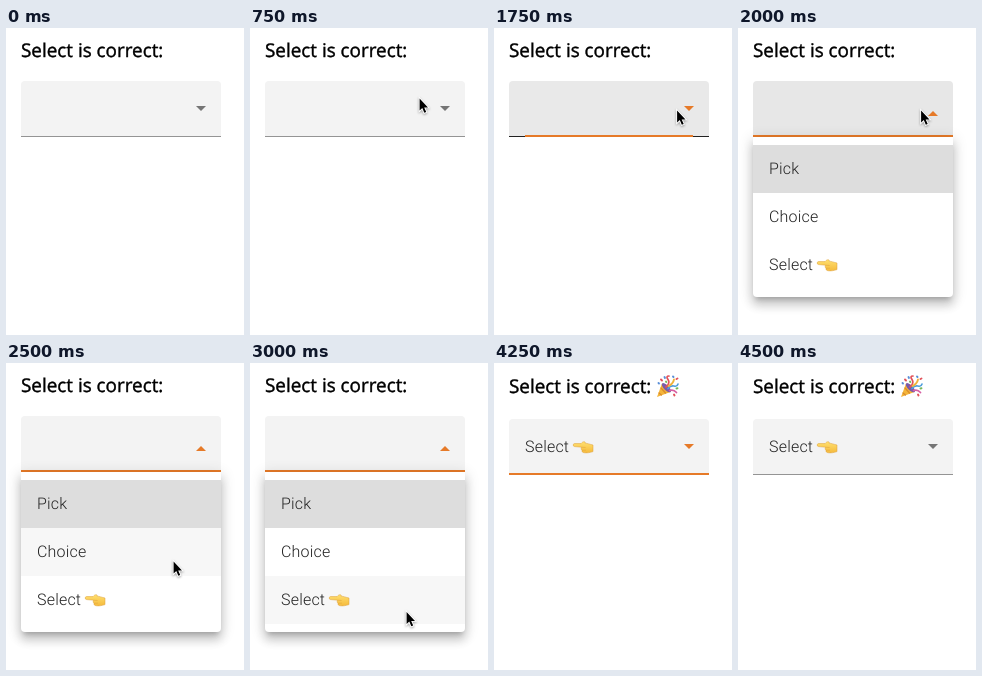
An HTML page for the animation above (5.5 s loop, 238 px wide and 307 px high).

```html
<!DOCTYPE html>
<html lang="en">
<head>
<meta charset="utf-8">
<title>Select is correct</title>
<style>
  html, body { margin: 0; width: 100%; height: 100%; overflow: hidden; background: #fff; }
  svg { display: block; width: 238px; height: 307px; text-rendering: geometricPrecision; }
  .title { font: 400 18.9px "Open Sans", sans-serif; stroke: #000; stroke-width: .4px; }
  .option { font: 300 16px Roboto, sans-serif; letter-spacing: .2px; fill: #212121; }
  .panel {
    height: 160px; background: #fff; border-radius: 0 0 4px 4px;
    box-shadow: 0 5px 5px -3px rgba(0,0,0,.2), 0 8px 10px 1px rgba(0,0,0,.14), 0 3px 14px 2px rgba(0,0,0,.12);
  }
  .pointer { filter: drop-shadow(0 1px 1px rgba(0,0,0,.35)); }
</style>
</head>
<body>
<svg viewBox="0 0 238 307">
  <defs>
    <linearGradient id="skin" x2="0" y2="1">
      <stop stop-color="#ffe070"/><stop offset="1" stop-color="#f5ba3c"/>
    </linearGradient>
    <g id="hand" stroke="#dc9f38" stroke-width=".5" stroke-linejoin="round">
      <path fill="url(#skin)" d="M8 3.6C9 2.4 10 1.6 11.2 1.7C12.4 1.8 12.3 2.6 12 3.2C14.5 3.2 17 4.4 20 5V11.6C17 12.6 14 13.1 11.5 12.8C9.4 12.6 8.6 11.4 9 10.2C8 9.5 8 8.2 8.6 7.2L1.6 6.6C-.3 6.4-.2 3.5 1.6 3.5Z"/>
      <path fill="none" d="M8.6 7.2L12.6 7.5M9 10.2H13"/>
    </g>
    <g id="popper" fill="none" stroke-linecap="round">
      <path fill="#f4b53a" d="M1 23L6 9.5Q11 11 14.5 18Z"/>
      <path stroke="#d98a2c" stroke-width="1.2" d="M5 14L9.5 19M3 19L5.4 21"/>
      <ellipse fill="#7a5aa8" cx="10.4" cy="13.7" rx="2.5" ry="6" transform="rotate(-45 10.4 13.7)"/>
      <path stroke="#e2525a" stroke-width="1.7" d="M10 13Q14.5 9 12 5.5T13 2"/>
      <path stroke="#4f9fdc" stroke-width="1.7" d="M12 14.5Q15 11 18 12T22 10"/>
      <path stroke="#f0b43c" stroke-width="1.9" d="M12.5 12Q17 10 18 5.5"/>
      <path stroke="#d65fa3" stroke-width="1.7" d="M13.5 16.5Q17.5 15 20.5 18.5"/>
      <path stroke="#e2525a" stroke-width="1.9" d="M5 5.5L6 6.5M20.5 5L21.5 4.5M18 20.5L18.5 21.5"/>
      <path stroke="#5a8fd8" stroke-width="1.9" d="M8.5 3L9 4M17 2.5L17.5 3M2.5 9L3 9.5"/>
      <path stroke="#78b85a" stroke-width="1.9" d="M10 7.5L10.3 8M20.5 14.5L21.5 14.3"/>
    </g>
  </defs>

  <g id="heading">
    <text class="title" x="15" y="29">Select is correct:</text>
    <use id="party" href="#popper" x="162" y="10"/>
  </g>

  <g id="field">
    <path id="fill" d="M15 109V57a4 4 0 0 1 4-4H211a4 4 0 0 1 4 4V109Z"/>
    <rect id="underline" x="15" y="108" width="200" height="1"/>
    <rect id="focusLine" y="107" height="2" fill="#e67a28"/>
    <path id="arrow" d="M190 78H200L195 83Z"/>
    <g id="value">
      <text class="option" x="31" y="86">Select</text>
      <use href="#hand" x="79" y="74"/>
    </g>
  </g>

  <g id="menu">
    <foreignObject x="15" y="109" width="200" height="160" overflow="visible">
      <div class="panel"></div>
    </foreignObject>
    <rect x="15" y="117" width="200" height="48" fill="#dddddd"/>
    <rect id="hover" x="15" width="200" height="48" fill="#f7f7f7"/>
    <text class="option" x="31" y="146">Pick</text>
    <text class="option" x="31" y="194">Choice</text>
    <text class="option" x="31" y="242">Select</text>
    <use href="#hand" x="79" y="230"/>
  </g>

  <path id="pointer" class="pointer" stroke="#fff" stroke-width="1.8" paint-order="stroke"
        d="M.6 .6V12.6L3.3 10.1L5.3 14.8L7.2 14L5.2 9.4H9Z"/>
</svg>
<script>
  const LOOP = 5500;
  const ORANGE = "#e67a28", GREY = "#757575";
  const part = Object.fromEntries(
    [...document.querySelectorAll("svg > [id], svg > g [id]")].map(el => [el.id, el]));

  // Each track is a list of [start time, value]; values hold until the next start.
  const tracks = {
    pointer: [[0, null], [750, [169, 70]], [1000, [165, 72]], [1250, [182.5, 68]],
              [1500, [182.5, 82]], [2250, [176, 105]], [2500, [167, 198]],
              [2750, [162, 232]], [3000, [156, 248.5]], [3250, [156, 249]], [4250, null]],
    fill: [[0, "#f3f3f3"], [1250, "#e9e9e9"], [2000, "#e7e7e7"], [2250, "#f3f3f3"]],
    underline: [[0, "#949494"], [1250, "#222"], [2250, "#949494"]],
    focusWidth: [[0, 0], [1750, 168], [2000, 200], [4500, 0]],
    arrowColor: [[0, GREY], [1750, ORANGE], [4500, GREY]],
    arrowUp: [[0, false], [2000, true], [3500, false]],
    open: [[0, false], [2000, true], [3250, false]],
    hoverY: [[0, null], [2500, 165], [2750, 213]],
    chosen: [[0, false], [3250, true]]
  };

  const valueAt = (track, t) => track.findLast(([start]) => start <= t)[1];
  const set = (el, name, value) => el.setAttribute(name, value);
  const show = (el, visible) => set(el, "visibility", visible ? "visible" : "hidden");
  const move = (el, x, y) => set(el, "transform", `translate(${x} ${y})`);

  function render(t) {
    const now = Object.fromEntries(
      Object.entries(tracks).map(([name, track]) => [name, valueAt(track, t)]));

    move(part.heading, 0, now.chosen ? 1 : 0);
    move(part.field, 0, now.chosen ? 3 : 0);
    show(part.party, now.chosen);
    show(part.value, now.chosen);

    set(part.fill, "fill", now.fill);
    set(part.underline, "fill", now.underline);
    set(part.focusLine, "x", 115 - now.focusWidth / 2);
    set(part.focusLine, "width", now.focusWidth);
    set(part.arrow, "fill", now.arrowColor);
    set(part.arrow, "transform", now.arrowUp ? "rotate(180 195 83)" : "");

    show(part.menu, now.open);
    show(part.hover, now.open && now.hoverY !== null);
    if (now.hoverY !== null) set(part.hover, "y", now.hoverY);

    show(part.pointer, now.pointer);
    if (now.pointer) move(part.pointer, ...now.pointer);
  }

  const begin = performance.now();
  function tick() {
    render((performance.now() - begin) % LOOP);
    requestAnimationFrame(tick);
  }
  tick();
</script>
</body>
</html>
```
